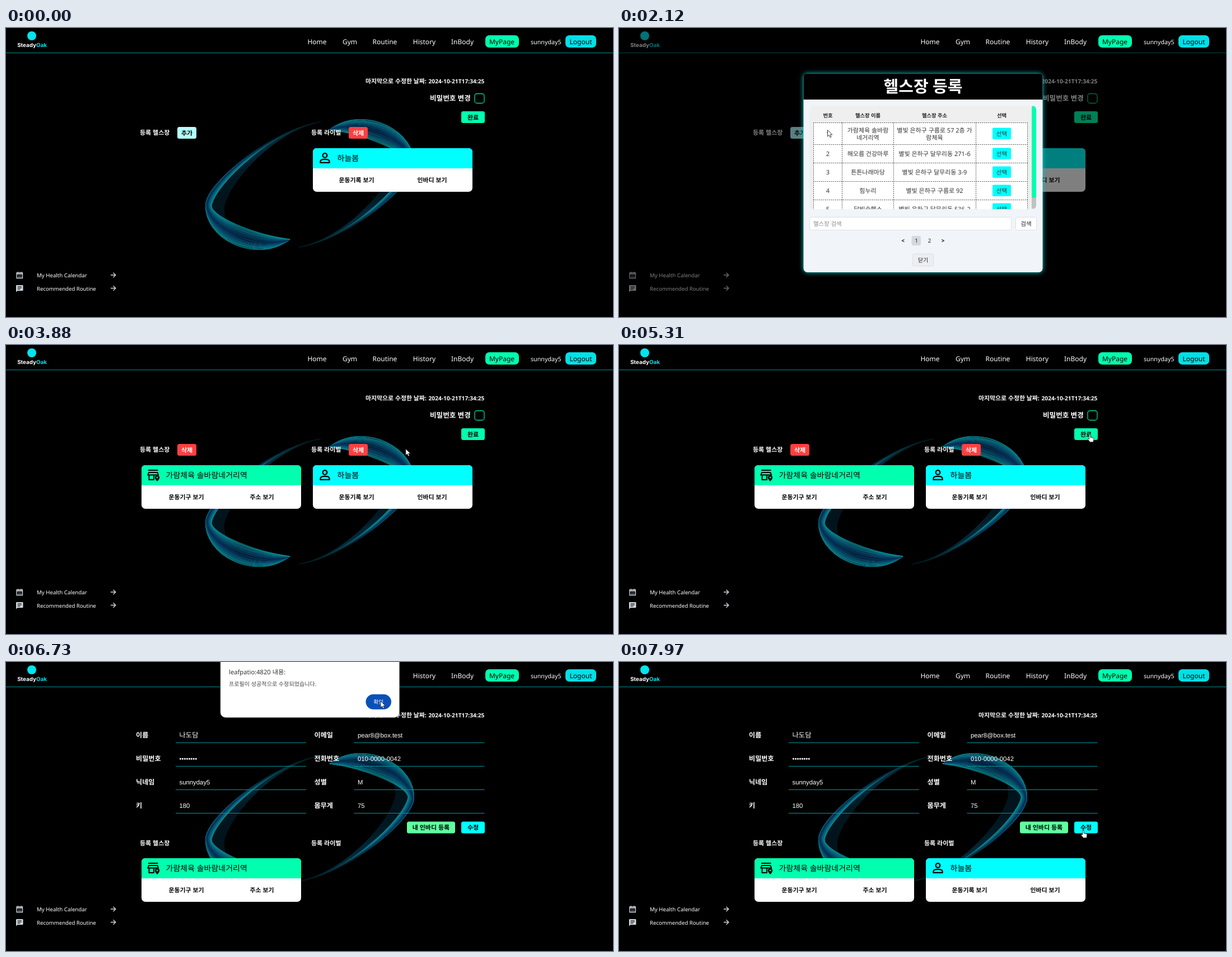
An HTML page that plays this animation: 1084 by 517 pixels, repeating every 8 s.

```html
<!DOCTYPE html>
<html lang="ko">
<head>
<meta charset="utf-8">
<style>
html, body { margin: 0; height: 100%; overflow: hidden; background: #000 }
svg { display: block; width: 100vw; height: 100vh; text-rendering: geometricPrecision;
  font-family: 'Noto Sans', 'Noto Sans CJK KR', sans-serif }
.b { font-weight: bold }
.m { font-weight: 500 }
.c { text-anchor: middle }
.a { font-family: 'Liberation Sans', 'Noto Sans CJK KR', sans-serif }
</style>
</head>
<body>
<svg id="stage" viewBox="0 0 1084 517"></svg>
<script>
const GREEN = '#00ffae', CYAN = '#00ffff', RED = '#ff4040', TEAL = '#00999f';

// Drawing helpers
const text = (x, y, str, size, fill = '#fff', cls = '') =>
  `<text x="${x}" y="${y}" font-size="${size}" fill="${fill}" class="${cls}">${str}</text>`;
const box = (x, y, w, h, r, fill, more = '') =>
  `<rect x="${x}" y="${y}" width="${w}" height="${h}" rx="${r}" fill="${fill}" ${more}/>`;
const path = (d, stroke, width = 1, more = '') =>
  `<path d="${d}" fill="none" stroke="${stroke}" stroke-width="${width}" ${more}/>`;
const group = (id, body, more = '') => `<g id="${id}" ${more}>${body}</g>`;
const button = (x, y, w, h, fill, str, ink = '#000') =>
  box(x, y, w, h, 3.5, fill) + text(x + w / 2, y + h / 2 + 4, str, 11, ink, 'b c');

// One folded half of the ring; the other half is the same turned by 180 degrees
function ribbon() {
  let s = '';
  for (let i = 0; i < 12; i++) {
    const t = i / 11;
    s += path(`M562 168C485 182 ${378 + 22 * t} 270 ${368 + 21 * t} 320
      C${362 + 24 * t} 370 ${420 + 20 * t} ${415} 507 378`, '#0b5f88', .8, 'opacity=".5"');
  }
  for (let i = 0; i < 38; i++) {
    const t = i / 37, u = t * t, m = 1 - Math.abs(2 * t - 1), wave = 2 * Math.sin(i * 2.4);
    s += path(`M562 168C480 180 ${364 + 10 * u} ${272 + 6 * u} ${357 + 10 * u} ${313 + 5 * u}
      C${350 + 16 * t} ${375 - 38 * t} ${445 + wave} ${425 - 55 * t + wave} 507 378`,
      `hsl(${183 + 27 * m} 88% ${30 - 13 * m}%)`, 1.1);
  }
  return `<linearGradient id="fade" gradientUnits="userSpaceOnUse" x1="0" y1="166" x2="0" y2="235">
      <stop stop-color="#222"/><stop offset="1" stop-color="#fff"/></linearGradient>
    <mask id="veil" maskUnits="userSpaceOnUse" x="300" y="140" width="300" height="280">
      ${box(300, 140, 300, 280, 0, 'url(#fade)')}</mask>
    ${group('half', s, 'mask="url(#veil)"')}
    <use href="#half" transform="rotate(180 542.5 280)"/>`;
}

const sidebar = () => {
  const ink = '#d3dbe2', arrow = y => path(`M187 ${y}h8.5m-4-4.3l4.3 4.3l-4.3 4.3`, ink, 1.3);
  return path('M19 438h10.5v9.5h-10.5zM19 440h10.5M21.5 436v2M27 436v2', ink, 1.3)
    + path('M21.5 443h6M21.5 445.3h6', ink, 1.2, 'stroke-dasharray="1.2"')
    + `<path d="M18 461q0-1 1-1h10.5q1 0 1 1v8q0 1-1 1h-9l-2.5 2.5z" fill="${ink}"/>`
    + path('M20.5 462.7h7.5M20.5 465h7.5M20.5 467.3h5', '#000', 1)
    + text(55, 446, 'My Health Calendar', 9.7) + text(55, 470, 'Recommended Routine', 9.6)
    + arrow(442) + arrow(465.5);
};

const logo = () => `<circle cx="46" cy="14" r="8" fill="#00e5ee"/>
  <text x="46.5" y="34" font-size="9.8" font-family="Inter, sans-serif" class="b c"
    fill="#fff">Steady<tspan fill="#00e5ee">Oak</tspan></text>`;

const nav = () =>
  [['Home', 555.5], ['Gym', 614], ['Routine', 676.5], ['History', 747], ['InBody', 815]]
    .map(([s, x]) => text(x, 29, s, 12, '#fff', 'c')).join('')
  + box(856, 13, 60, 22, 7, GREEN) + text(885.5, 29, 'MyPage', 12, '#000', 'c')
  + text(937, 29, 'sunnyday5', 10.7)
  + box(999, 13, 55, 22, 7, '#00e0e6') + text(1026.5, 29, 'Logout', 12, '#000', 'c');

const card = (x, fill, icon, name, left, lx, right, rx) =>
  box(x, 215, 285, 78, 7, '#fff')
  + `<path d="M${x} 251v-29q0-7 7-7h271q7 0 7 7v29z" fill="${fill}"/>` + icon
  + text(x + 43.5, 238, name, 14, '#000', 'm')
  + text(lx, 276, left, 10.9, '#000', 'b c') + text(rx, 276, right, 10.9, '#000', 'b c');

const shopIcon = path('M254 224h17.5M255 228h15.5l1.5 4.5h-18.5zM255.5 233v8h8.5v-8M269 233v2', '#000', 2)
  + `<path d="M270 244c-6.5-6-4.5-11 0-11s6.5 5 0 11" fill="#000"/>
     <circle cx="270" cy="237" r="1.4" fill="${GREEN}"/>`;
const personIcon = '<circle cx="569.5" cy="228" r="3.8" fill="none" stroke="#000" stroke-width="2.3"/>'
  + path('M561.5 240.8v-2.3c0-4.8 16-4.8 16 0v2.3z', '#000', 2.3);

const headings = y => text(239, y, '등록 헬스장', 11, '#fff', 'b') + text(545, y, '등록 라이벌', 11, '#fff', 'b');

const editView = () =>
  text(757, 130, '비밀번호 변경', 12.6, '#fff', 'b')
  + box(837, 117.5, 17, 17, 4, 'none', 'stroke="#00d697" stroke-width="1.3"')
  + button(813, 149, 42, 21, GREEN, '완료') + headings(191)
  + group('add', button(306, 177, 34, 21, '#b5ffff', '추가'))
  + group('del', button(306, 177, 34, 21, RED, '삭제', '#fff'))
  + button(612, 177, 34, 21, RED, '삭제', '#fff');

const profileView = () =>
  [['이름', '나도담', '이메일', 'pear8@box.test'],
   ['비밀번호', '••••••••', '전화번호', '010-0000-0042'],
   ['닉네임', 'sunnyday5', '성별', 'M'],
   ['키', '180', '몸무게', '75']].map((row, i) => {
    const y = 135 + 42 * i;
    const field = (x, k) => text(x, y, row[k], 12.1, '#fff', 'b')
      + text(x + 77.5, y, row[k + 1], i || k ? 11.35 : 12.3, '#fff', 'a')
      + path(`M${x + 71} ${y + 9.5}h233`, TEAL);
    return field(232, 0) + field(550.5, 2);
  }).join('')
  + button(716, 285.5, 86, 21, '#5fff9f', '내 인바디 등록') + button(813, 285.5, 42, 21, CYAN, '수정')
  + headings(327.5);

function modal() {
  const cols = [373, 444.5, 563.5, 683.5], lines = [169, 208, 241, 274, 307, 340];
  const rows = [['가람체육 솔바람|네거리역', '별빛 은하구 구름로 57 2층 가|람체육'],
    ['해오름 건강마루', '별빛 은하구 달무리동 271-6'], ['튼튼나래마당', '별빛 은하구 달무리동 3-9'],
    ['힘누리', '별빛 은하구 구름로 92'], ['달빛숲헬스', '별빛 은하구 달무리동 536-2']];
  const ink = '#333';
  const cell = (x, y, s) => {
    const parts = s.split('|');
    return parts.map((p, i) => text(x, y + 4 + (i - (parts.length - 1) / 2) * 13, p, 11, ink, 'c')).join('');
  };
  const table = box(340, 139, 405, 185, 0, '#efefef') + box(347, 169, 383, 171, 0, '#fff')
    + ['번호', '헬스장 이름', '헬스장 주소', '선택'].map((s, i) => text(cols[i], 160, s, 9.3, '#222', 'b c')).join('')
    + rows.map((r, i) => {
      const y = (lines[i] + lines[i + 1]) / 2 + .5;
      return cell(cols[0], y, String(i + 1)) + cell(cols[1], y, r[0]) + cell(cols[2], y, r[1])
        + box(667, y - 10.5, 33, 20.5, 2, CYAN) + text(683.5, y + 3.5, '선택', 10.5, ink, 'c');
    }).join('')
    + path(lines.map(y => `M347 ${y + .5}h383`).join('')
      + [347, 398, 490, 637, 729].map(x => `M${x + .5} 169v160`).join(''), '#555', 1, 'stroke-dasharray="2 1.5"')
    + box(737, 139, 8, 185, 4, '#c1c1c1') + box(737, 139, 8, 165, 4, GREEN);
  const border = 'stroke="#dcdfe3" stroke-width="1"';
  return box(0, 0, 1084, 517, 0, '#000', 'opacity=".5"')
    + box(329.5, 81.5, 427, 355.5, 7, '#f1f5f9', 'style="filter:drop-shadow(0 0 4px #00c8c8)"')
    + '<path d="M329.5 128v-39.5q0-7 7-7h413q7 0 7 7v39.5z" fill="#000"/>'
    + text(543, 115, '헬스장 등록', 29, '#fff', 'b c')
    + `<clipPath id="pane">${box(340, 139, 405, 185, 7, '#000')}</clipPath>`
    + `<g clip-path="url(#pane)">${table}</g>`
    + box(340.5, 338.5, 360, 23, 3, '#fff', border) + text(347, 353.5, '헬스장 검색', 10.4, '#888')
    + box(708.5, 338.5, 37, 23, 3, '#fff', border) + text(727, 353.5, '검색', 10.5, '#222', 'c')
    + box(522.5, 372, 16.5, 17, 3, '#d5d9dd')
    + text(507, 383.5, '&lt;', 10, '#111', 'b c') + text(531, 383.5, '1', 10, '#222', 'c')
    + text(554.5, 383.5, '2', 10, '#222', 'c') + text(578.5, 383.5, '&gt;', 10, '#111', 'b c')
    + box(524.5, 404, 37, 22, 3, '#eceff2', border) + text(543, 419, '닫기', 10.2, '#222', 'c');
}

const dialog = () =>
  box(383, -20, 319.5, 121, 9, '#fff', 'stroke="#999" stroke-width=".6"')
  + text(398, 23.5, 'leafpatio:4820 내용:', 11.2, '#333') + text(398, 44.5, '프로필이 성공적으로 수정되었습니다.', 10.1, '#444')
  + group('ring', box(640.5, 57.5, 49.5, 31, 15.5, 'none', 'stroke="#0b50b8" stroke-width="1.5"'))
  + box(642.5, 59.5, 45.5, 27, 13.5, '#0b50b8') + text(665.2, 76.5, '확인', 9.8, '#fff', 'c');

const pointer = () => '<circle id="glow" r="8" fill="#ff0" opacity=".5"/>'
  + '<g fill="#fff" stroke="#111" stroke-width=".8" stroke-linejoin="round">'
  + '<path id="arrow" d="M0 0v11.5l2.7-2.5 1.9 4.3 2-.9-1.9-4.1h3.8z"/>'
  + '<path id="hand" d="M-1.3 1.3c0-1.8 2.4-1.8 2.4 0v4l4.2.9c1.4.3 1.8 1.2 1.6 2.5l-.9 5h-5.8l-3.7-4.7c-.8-1.1.8-2.2 1.7-1.2l.5.6z"/></g>';

stage.innerHTML = ribbon() + path('M0 44.5h1084', '#006868', 1.3) + logo() + sidebar()
  + text(642, 99, '마지막으로 수정한 날짜:', 10.9, '#fff', 'b') + text(754.5, 99, '2024-10-21T17:34:25', 10.2, '#fff', 'b')
  + group('edit', editView()) + group('profile', profileView())
  + group('gym', card(242, GREEN, shopIcon, '가람체육 솔바람네거리역', '운동기구 보기', 322, '주소 보기', 457))
  + group('rival', card(548, CYAN, personIcon, '하늘봄', '운동기록 보기', 626, '인바디 보기', 761))
  + group('modal', modal()) + nav() + group('alert', dialog()) + group('mouse', pointer());

// Pointer path: time, x, y
const route = [[610, 515, 488], [1320, 329, 183], [2060, 329, 183], [2300, 500, 181], [2590, 691, 189],
  [3820, 691, 189], [4210, 837, 169], [4780, 837, 169], [4910, 841, 160], [5730, 841, 160], [5930, 650, 53],
  [6070, 650, 53], [6130, 648, 56], [6200, 641, 58], [6330, 641, 58], [6540, 669, 70], [7130, 669, 70],
  [7300, 640, 120], [7450, 623, 210], [7620, 690, 315], [7800, 790, 320], [7970, 829, 301], [8000, 829, 301]];

const $ = id => document.getElementById(id);
const show = (id, on) => $(id).style.display = on ? '' : 'none';
const move = (id, x, y) => $(id).setAttribute('transform', `translate(${x} ${y})`);

function draw(now) {
  const t = now % 8000;
  const during = (...spans) => spans.some(([a, b]) => t >= a && t < b);
  const saved = t >= 6670, drop = saved ? 136 : 0;

  show('edit', !saved);
  show('profile', saved);
  show('add', t < 3150);
  show('del', t >= 3150);
  show('gym', t >= 3150);
  show('rival', !during([6670, 6870]));
  move('gym', 0, drop);
  move('rival', 0, drop);
  show('modal', during([1590, 3150]));

  const open = Math.min(1, Math.max(0, (t - 5340) / 180));
  show('alert', during([5380, 6800]));
  show('ring', t < 6600);
  $('alert').style.opacity = open;
  move('alert', 0, saved ? -1.8 : 8 * (open - 1));

  show('mouse', t >= 610);
  const i = Math.max(1, route.findIndex(p => p[0] > t)), [t0, x0, y0] = route[i - 1], [t1, x1, y1] = route[i];
  const k = Math.max(0, (t - t0) / (t1 - t0));
  move('mouse', x0 + (x1 - x0) * k, y0 + (y1 - y0) * k);
  const hand = during([1320, 1450], [2730, 2990], [4840, 5730], [7900, 8000]);
  show('hand', hand);
  show('arrow', !hand);
  show('glow', during([1450, 1520], [2990, 3150], [5240, 5310], [6600, 6670]));
}

const start = performance.now();
(function tick() {
  draw(performance.now() - start);
  requestAnimationFrame(tick);
})();
</script>
</body>
</html>
```
